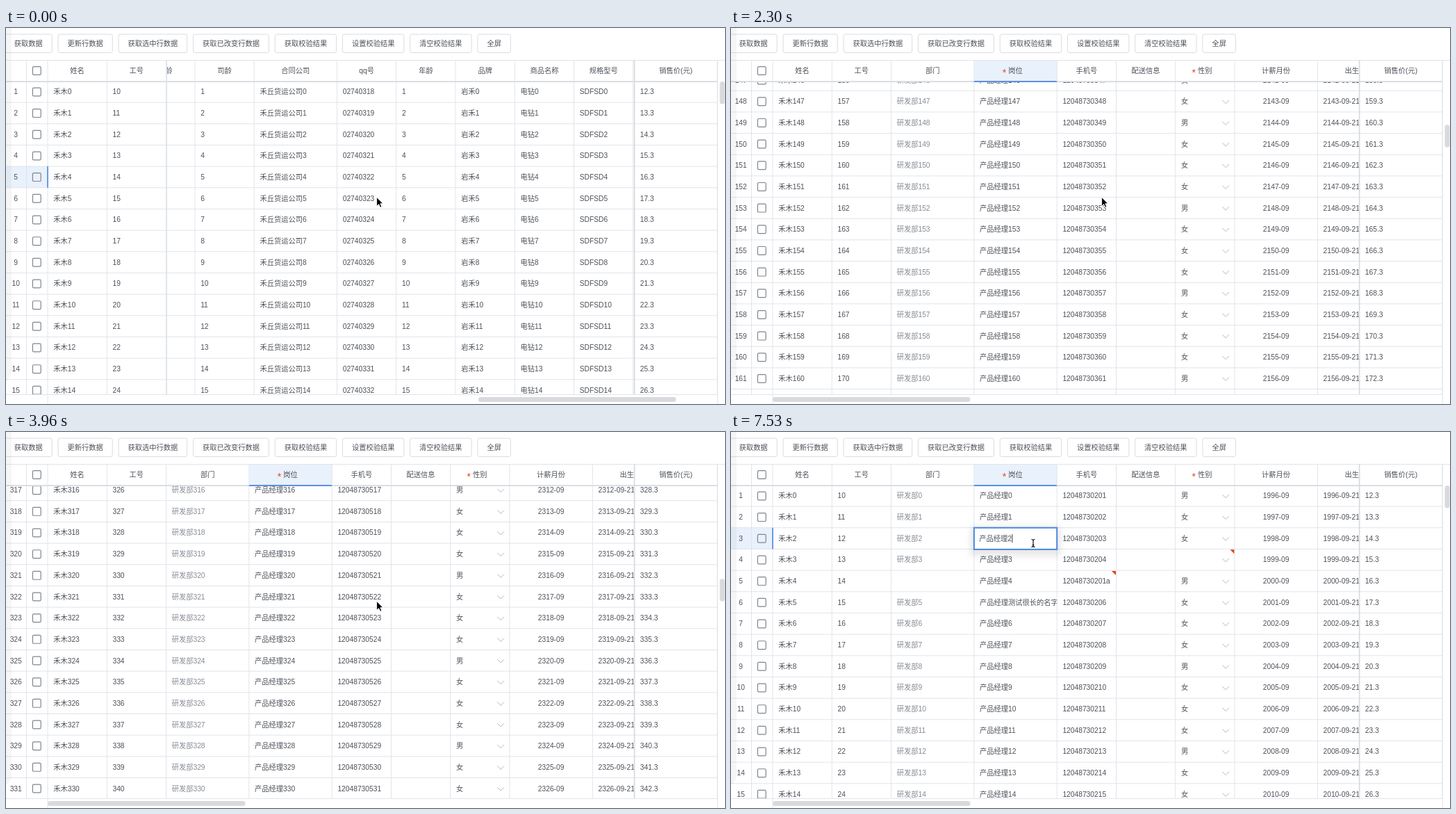
An HTML page that plays this animation: 1035 px wide and 541 px high, repeating every 8 s.

```html
<!DOCTYPE html>
<html lang="zh">
<head>
<meta charset="utf-8">
<style>
  html, body { margin: 0; width: 100%; height: 100%; overflow: hidden; background: #fff; }
  svg { display: block; }
  text { font: 10.25px "Liberation Sans", "Noto Sans CJK SC", "Noto Sans CJK", sans-serif; fill: #4c5059; white-space: pre; }
  .mid { text-anchor: middle; }
  .muted { fill: #858a94; }
  .star { font-size: 14px; fill: #ea4a1c; text-anchor: middle; }
  .grid { stroke: #e0e4ea; }
  .edge { stroke: #d6dae0; stroke-width: 1.7; }
  .caret { stroke: #333; }
  .box { fill: none; stroke: #7f858e; stroke-width: 1.2; }
  .arrow { fill: none; stroke: #b4b8c0; }
  .error { fill: #ea3c15; }
  .pick { fill: #e9f1fc; }
  .blue { stroke: #5b90e6; stroke-width: 1.8; fill: none; }
  .thumb { fill: #d9dadd; }
</style>
</head>
<body>
<svg width="1035" height="541" viewBox="0 0 1035 541">
  <defs>
    <clipPath id="body"><rect y="77" width="1024" height="450"/></clipPath>
    <clipPath id="center"><rect x="230.5" y="46" width="674.5" height="481"/></clipPath>
    <filter id="soft" x="-30%" y="-100%" width="160%" height="300%"><feGaussianBlur stdDeviation="5"/></filter>
  </defs>
  <rect width="1035" height="541" fill="#fff"/>
  <g id="toolbar"></g>
  <g id="table"></g>
  <path d="M0 0H8V494Q8 503 0 508Z" opacity=".035"/>
  <g id="pointer"></g>
</svg>
<script>
const LOOP = 8000, SCALE = 0.8525, ROW = 30.67;
const LEFT = 60, TOP = 76.4, HEAD = 46, HEAD_MID = 61.3, BOTTOM = 527, RIGHT = 905, END = 1024;
const MAX_X = 2451.4 * SCALE;
const CLICK_AT = 5730, EDIT_AT = 7380, CARET_AT = 7530;
const REST = [533.6, 243.4], TARGET = [434.3, 158.6];

// time, horizontal scroll (share of the range), vertical scroll, pointer position
const steps = [
  [0, 1, 0, REST], [150, .9, 0, REST], [540, .52, 0, REST],
  [750, .14, 0, REST], [960, 0, 0, REST],
  [1440, 0, 1.7, REST], [1650, 0, 620, REST], [1870, 0, 1880, REST],
  [2080, 0, 3220, REST], [2300, 0, 4494.7, REST],
  [2540, 0, 5900, REST], [2770, 0, 7320, REST], [3000, 0, 8600, REST],
  [3230, 0, 9720, REST], [3460, 0, 10606.5, REST],
  [3730, 0, 9700, REST], [3970, 0, 7960, REST], [4200, 0, 6020, REST],
  [4440, 0, 4089, REST], [4680, 0, 2380, REST],
  [4920, 0, 980, REST], [5120, 0, 150, REST], [5330, 0, 0, [505, 218]],
  [5530, 0, 0, [450, 172]], [CLICK_AT, 0, 0, TARGET],
  [EDIT_AT, 0, 0, TARGET], [CARET_AT, 0, 0, TARGET]
];

const col = (title, width, value, extra = {}) => ({ title, width: width * SCALE, value, ...extra });
const date = shift => i => `${1996 + shift + i}-09-21`;
const plus = base => i => base + i;
const label = name => i => name + i;
const fixed = text => () => text;
const phone = i => i === 4 ? "12048730201a" : String(12048730201 + i);

const pinnedLeft = [
  col("姓名", 100, label("禾木")),
  col("工号", 100, plus(10))
];
const scrolling = [
  col("部门", 140, i => i === 4 ? "" : "研发部" + i, { style: "muted" }),
  col("岗位", 140, i => "产品经理" + (i === 5 ? "测试很长的名字" : i), { required: true, selected: true }),
  col("手机号", 100, phone, { errorRow: 4 }),
  col("配送信息", 100, fixed("")),
  col("性别", 100, i => i === 3 ? "" : i % 4 ? "女" : "男", { required: true, select: true, errorRow: 3 }),
  col("计薪月份", 140, i => `${1996 + i}-09`, { style: "mid" }),
  col("出生日期", 140, date(0)),
  col("入职日期", 140, date(20)),
  col("转正日期", 140, date(21)),
  col("学历", 100, fixed("本科")),
  col("专业", 100, label("专业")),
  col("婚姻", 100, fixed("未婚")),
  col("合同开始", 140, date(20)),
  col("合同结束", 140, date(23)),
  col("职级", 100, plus(1)),
  col("班次", 100, fixed("早班")),
  col("工作地点", 140, label("地点")),
  col("状态", 100, fixed("在职")),
  col("备注", 140, label("备注")),
  col("等级", 100, plus(1)),
  col("工龄", 100, plus(1)),
  col("司龄", 100, plus(1)),
  col("合同公司", 140, label("禾丘货运公司")),
  col("qq号", 100, i => "0" + (2740318 + i)),
  col("年龄", 100, plus(1)),
  col("品牌", 100, label("岩禾")),
  col("商品名称", 100, label("电钻")),
  col("规格型号", 100, label("SDFSD"))
];
const pinnedRight = [col("销售价(元)", 140, i => `${12 + i}.3`)];

const byId = id => document.getElementById(id);
const text = (x, y, value, style = "") => `<text x="${x}" y="${y + 3.7}" class="${style}">${value}</text>`;
const line = (x1, y1, x2, y2, style = "grid") =>
  `<path d="M${x1} ${y1}L${x2} ${y2}" class="${style}"/>`;
const rect = (x, y, w, h, attrs = 'fill="#fff"') =>
  `<rect x="${x}" y="${y}" width="${w}" height="${h}" ${attrs}/>`;
const checkbox = y => rect(38.4, y - 5.7, 11.8, 11.8, 'rx="1.6" class="box"');
const clip = (id, content) => `<g clip-path="url(#${id})">${content}</g>`;

function toolbar() {
  const names = ["获取数据", "更新行数据", "获取选中行数据", "获取已改变行数据",
    "获取校验结果", "设置校验结果", "清空校验结果", "全屏"];
  let x = -1.7;
  return names.map(name => {
    const width = name.length * 10.23 + 27;
    const button = rect(x, 9, width, 26.5, 'rx="2.6" fill="#fff" stroke="#d9dce1"') +
      text(x + width / 2, 22, name, "mid");
    x += width + 8.85;
    return button;
  }).join("");
}

function cell(c, x, i, y) {
  const right = x + c.width, top = y - ROW / 2;
  let out = text(c.style === "mid" ? x + c.width / 2 : x + 8.2, y, c.value(i), c.style);
  if (c.select) out += `<path class="arrow" d="M${right - 17.6} ${y - 1.6}l4.8 4.8l4.8 -4.8"/>`;
  if (c.errorRow === i) out += `<path class="error" d="M${right - 6.5} ${top + .8}h6.3v6.3z"/>`;
  return out;
}

function header(c, x) {
  const center = x + c.width / 2;
  let out = c.selected
    ? rect(x, HEAD + 1, c.width, 30, 'class="pick"') + line(x, 77, x + c.width, 77, "blue")
    : "";
  if (c.required) out += `<text class="star" x="${center - 16}" y="69">*</text>`;
  return out + text(center, HEAD_MID, c.title, "mid") + line(x + c.width, HEAD, x + c.width, 77);
}

function group(columns, start, rows) {
  let x = start, cells = "", heads = "";
  for (const c of columns) {
    if (x < END && x + c.width > LEFT) {
      cells += rows.map(r => cell(c, x, r.i, r.y)).join("") + line(x + c.width, 77, x + c.width, BOTTOM);
      heads += header(c, x);
    }
    x += c.width;
  }
  return { cells, heads };
}

function selection(c, x, row, editing, caret) {
  const top = row.y - ROW / 2, value = c.value(row.i);
  if (!editing) {
    return rect(x, top, c.width, ROW, 'class="pick"') + text(x + 8.2, row.y, value) +
      rect(x, top, c.width, ROW, 'class="blue"') +
      rect(x + c.width - 2.3, top + ROW - 2.3, 4.6, 4.6, 'fill="#5b90e6" stroke="#fff"');
  }
  return rect(x - 5, top - 2, c.width + 10, ROW + 12, 'opacity=".09" filter="url(#soft)"') +
    rect(x, top, c.width, ROW + .5, 'fill="#fff" stroke="#4b87df" stroke-width="2"') +
    text(x + 7.5, row.y, value) +
    (caret ? line(x + 55, row.y - 6, x + 55, row.y + 6, "caret") : "");
}

function table(t, scrollX, scrollY) {
  const first = Math.floor(scrollY / ROW);
  const rows = Array.from({ length: 16 }, (_, k) => ({
    i: first + k, y: TOP + (first + k + .5) * ROW - scrollY
  }));
  const start = LEFT + 200 * SCALE - scrollX;
  const center = group(scrolling, start, rows);
  const left = group(pinnedLeft, LEFT, rows);
  const right = group(pinnedRight, RIGHT - .4, rows);
  const picked = rows.find(r => r.i === (t < CLICK_AT ? 4 : 2));

  const rowLines = rows.map(r => line(0, r.y + ROW / 2, END, r.y + ROW / 2)).join("");
  const numbers = rows.map(r => text(14.2, r.y, r.i + 1, "mid") + checkbox(r.y)).join("");
  let rowPick = "", rowMark = "", cellPick = "";
  if (picked) {
    const top = picked.y - ROW / 2;
    rowPick = rect(0, top, LEFT, ROW, 'class="pick"');
    rowMark = line(LEFT, top, LEFT, top + ROW, "blue");
    cellPick = clip("center",
      selection(scrolling[1], start + scrolling[0].width, picked, t >= EDIT_AT, t >= CARET_AT));
  }

  const body = clip("center", center.cells) + rowPick + left.cells + right.cells +
    rowLines + numbers + line(29.5, 77, 29.5, BOTTOM) + line(LEFT, 77, LEFT, BOTTOM) +
    rowMark + cellPick;
  const heads = rect(0, HEAD, END, 31) + line(0, 77.2, END, 77.2, "edge") +
    clip("center", center.heads) + left.heads + right.heads +
    checkbox(HEAD_MID) + line(29.5, HEAD, 29.5, 77) + line(LEFT, HEAD, LEFT, 77);
  const frame = line(0, HEAD + .5, 1035, HEAD + .5) + line(0, BOTTOM + .5, END, BOTTOM + .5) +
    line(LEFT, BOTTOM, LEFT, 541) + line(END + .3, HEAD, END + .3, 541) +
    line(RIGHT - .4, HEAD, RIGHT - .4, BOTTOM, "edge") +
    (scrollX ? line(231.6, HEAD, 231.6, BOTTOM) : "");
  const thumbs = rect(LEFT + 620 * scrollX / MAX_X, 531, 284.5, 7, 'rx="3.5" class="thumb"') +
    rect(1027.5, 77 + scrollY * .01383, 7, 32.5, 'rx="3.5" class="thumb"');
  return clip("body", body) + heads + frame + thumbs;
}

function pointer(t, [x, y]) {
  const shape = t < EDIT_AT
    ? '<path d="M0 0V13L3 10.2L5.1 14.8L7.2 13.8L5.2 9.3H9.2Z" fill="#000" stroke="#fff" stroke-width=".9"/>'
    : '<path d="M-2.6 -5.5Q0 -5.5 0 -3.5V3.5Q0 5.5 -2.6 5.5M2.6 -5.5Q0 -5.5 0 -3.5V3.5Q0 5.5 2.6 5.5M-1.4 2.5H1.4" ' +
      'transform="translate(.7 1.4)" fill="none" stroke="#111" stroke-width="1.2"/>';
  return `<g transform="translate(${x} ${y})">${shape}</g>`;
}

let shown = null;
function draw(t) {
  const step = steps.findLast(s => s[0] <= t);
  if (step === shown) return;
  shown = step;
  const [time, share, scrollY, position] = step;
  byId("table").innerHTML = table(time, share * MAX_X, scrollY);
  byId("pointer").innerHTML = pointer(time, position);
}

byId("toolbar").innerHTML = toolbar();
const began = performance.now();
function tick() {
  draw((performance.now() - began) % LOOP);
  requestAnimationFrame(tick);
}
tick();
</script>
</body>
</html>
```
